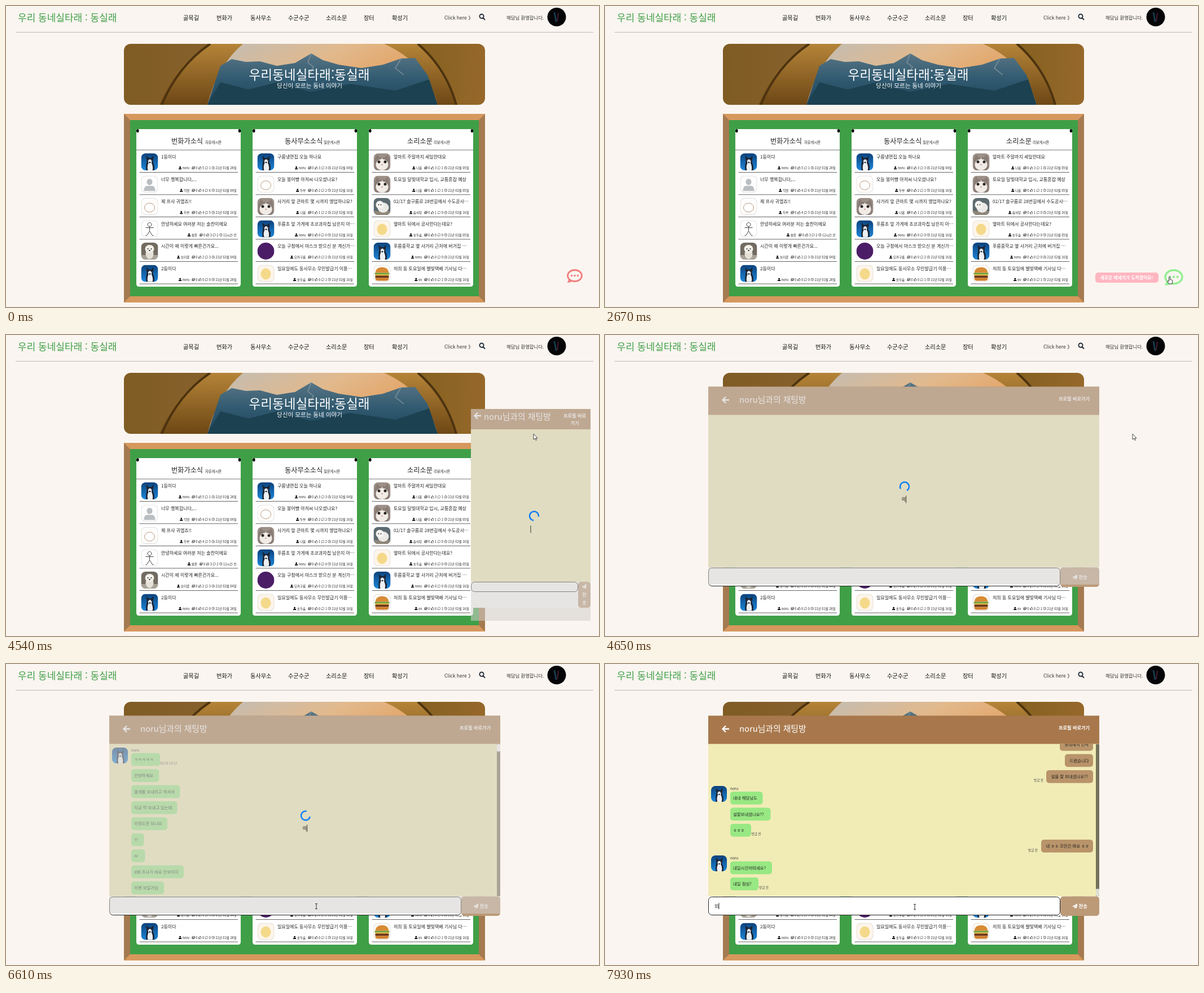
An HTML page for the animation above (8000 ms loop, 1051x533 px).

```html
<!DOCTYPE html>
<html lang="ko">
<head>
<meta charset="utf-8">
<style>
html, body { margin: 0; width: 100%; height: 100%; overflow: hidden; background: #faf5f0; }
svg { display: block; width: 1051px; height: 533px; }
text { font-family: "Noto Sans CJK KR", "Noto Sans CJK", "Noto Sans", sans-serif; white-space: pre; }
</style>
</head>
<body>
<svg id="stage" viewBox="0 0 1051 533">
<defs>
  <clipPath id="round"><rect width="30" height="30" rx="8"/></clipPath>
  <clipPath id="bannerClip"><rect x="209" y="67" width="640" height="108" rx="12"/></clipPath>
  <clipPath id="logClip"><rect x="183" y="141.5" width="693" height="270"/></clipPath>
  <linearGradient id="sky" x2="1" y2=".5"><stop stop-color="#bfbdb8"/><stop offset=".5" stop-color="#e2b98c"/><stop offset="1" stop-color="#e39a55"/></linearGradient>
  <linearGradient id="hills" x2="0" y2="1"><stop stop-color="#587585"/><stop offset=".5" stop-color="#315a70"/><stop offset="1" stop-color="#1d4459"/></linearGradient>
  <linearGradient id="wall"><stop stop-color="#7f5c24"/><stop offset=".2" stop-color="#86602a"/><stop offset=".8" stop-color="#83601f"/><stop offset="1" stop-color="#96682a"/></linearGradient>
  <linearGradient id="arch" x2="0" y2="1"><stop stop-color="#b58438"/><stop offset="1" stop-color="#6d4715"/></linearGradient>
  <linearGradient id="blue" x2="0" y2="1"><stop stop-color="#0b427c"/><stop offset="1" stop-color="#1c86da"/></linearGradient>
  <linearGradient id="listHead" x2="0" y2="1"><stop stop-color="#a97c57"/><stop offset="1" stop-color="#bd9674"/></linearGradient>

  <symbol id="user" viewBox="0 0 10 10"><circle cx="5" cy="2.8" r="2.6"/><path d="M0 10Q0 5.8 3 5.8H7Q10 5.8 10 10Z"/></symbol>
  <symbol id="images" viewBox="0 0 10 10"><path d="M2.5 1H9.5V7H2.5ZM.6 3V9H8M3 6L5 4L6 5L7.5 3L9 6" fill="none" stroke="#222" stroke-width="1.2"/></symbol>
  <symbol id="thumb" viewBox="0 0 10 10"><path d="M.6 4.5H2.6V9.4H.6ZM2.6 5L5 2.5V.7H6.3V4H9.4L8.3 9.3H4L2.6 8.5" fill="none" stroke="#222" stroke-width="1.1"/></symbol>
  <symbol id="comment" viewBox="0 0 10 10"><path d="M1.7 8L.6 9.5L3.5 8.5C7 9.3 9.4 7 9.4 4.8C9.4-.3.6-.3.6 4.8Q.6 6.7 1.7 8Z" fill="none" stroke="#222" stroke-width="1.1"/></symbol>
  <symbol id="clock" viewBox="0 0 10 10"><path d="M5 .6A4.4 4.4 0 1 1 4.99.6M5 2.5V5.3L7 6.4" fill="none" stroke="#222" stroke-width="1.2"/></symbol>
  <symbol id="plane" viewBox="0 0 10 10"><path d="M10 0L8.3 9L5.4 7.8L4 10V7.2L8 2.5L3 6.7L0 5.6Z" fill="#fff"/></symbol>
</defs>
</svg>
<script>
const LOOP = 8000;
const svg = document.getElementById('stage');
const $ = id => document.getElementById(id);
const rect = (x, y, w, h, fill, rx = 0, more = '') =>
  `<rect x="${x}" y="${y}" width="${w}" height="${h}" rx="${rx}" fill="${fill}" ${more}/>`;
const path = (d, fill, stroke = 'none', w = 1, more = '') =>
  `<path d="${d}" fill="${fill}" stroke="${stroke}" stroke-width="${w}" ${more}/>`;
const oval = (x, y, rx, ry, fill) => `<ellipse cx="${x}" cy="${y}" rx="${rx}" ry="${ry}" fill="${fill}"/>`;
const text = (x, y, s, size, fill = '#222', weight = 400, anchor = 'start') =>
  `<text x="${x}" y="${y}" font-size="${size}" fill="${fill}" font-weight="${weight}" text-anchor="${anchor}">${s}</text>`;
const use = (id, x, y, w) => `<use href="#${id}" x="${x}" y="${y}" width="${w}" height="${w}"/>`;
const group = (id, body, more = '') => `<g id="${id}" ${more}>${body}</g>`;
const em = s => [...s].reduce((n, c) => n + (c > '\u3130' ? .92 : c === ' ' ? .224 : '.!'.includes(c) ? .28 : .555), 0);

// Avatars, each in a 30 by 30 box
const avatars = {
  husky: rect(0, 0, 30, 30, 'url(#blue)') + path('M9 30Q8 20 10 15L9 4L13 8H18L22 4L21 16Q25 22 23 30Z', '#1b2433') +
    path('M12 12Q15.5 9 19 12L18.500 17Q22 24 20 30H12Q10 23 13 17Z', '#edf0f3') + oval(15.500, 16, 1.500, 1.200, '#16202c') +
    oval(13, 12, .8, .8, '#224') + oval(18, 12, .8, .8, '#224'),
  anon: rect(0, 0, 30, 30, '#fdfdfd') + oval(15, 11, 5, 5.5, '#b9bec2') + path('M5 27Q5 18 11 18H19Q25 18 25 27Z', '#b9bec2'),
  pale: rect(0, 0, 30, 30, '#fffdfb') + '<ellipse cx="15" cy="17" rx="9" ry="8" fill="#fff" stroke="#b99a80"/>',
  stick: rect(0, 0, 30, 30, '#fff') + path('M15 4A3.500 3.500 0 1 1 14.990 4M15 11V19L10 27H8M15 19L20 27H22M8 13H22', 'none', '#444'),
  dog: rect(0, 0, 30, 30, '#716b61') + rect(0, 22, 30, 8, '#a9a398') + oval(15, 20, 7, 9, '#e6e1d8') + oval(15, 11, 8, 7, '#f4f1eb') +
    oval(12, 11, 1, 1, '#222') + oval(18, 11, 1, 1, '#222') + oval(15, 14, 1.500, 1, '#222'),
  cat: rect(0, 0, 30, 30, '#9d9088') + path('M2 30V10L6 2L11 7H20L25 2L28 11V30Z', '#8a7d76') + oval(15, 20, 11, 10, '#f1ebe6') +
    path('M15 7L19 20H11Z', '#f1ebe6') + oval(9.500, 15, 2.500, 2.500, '#2c2725') + oval(20.500, 15, 2.500, 2.500, '#2c2725') + oval(15, 20, 1.500, 1, '#c98f88'),
  puff: rect(0, 0, 30, 30, '#5d6b70') + rect(0, 23, 30, 7, '#8e8779') + oval(17, 17, 10, 9, '#ebe9e5') + oval(11, 12, 7, 7, '#f5f3f0') +
    oval(9, 12, .9, .9, '#222') + oval(13, 12, .9, .9, '#222'),
  chick: rect(0, 0, 30, 30, '#fdf5ea') + oval(15, 16, 9, 10, '#f5d98a'),
  burger: rect(0, 0, 30, 30, '#fdfaf5') + path('M3 14Q4 4 15 4T27 14Z', '#d88b35') + rect(2, 14, 26, 3, '#6da23a', 1) +
    rect(3, 17, 24, 3, '#e4b43c') + rect(3, 19, 24, 4, '#6b3519', 1) + path('M3 23H27Q27 28 22 28H8Q3 28 3 23Z', '#d0812f'),
  night: rect(0, 0, 30, 30, '#050507') + path('M12 8L14 22', 'none', '#185064', 2.500) + path('M18 8L16 21', 'none', '#4a2034', 2)
};
const light = ['anon', 'pale', 'stick', 'chick', 'burger'];
const symbols = Object.entries(avatars).map(([id, art]) => `<symbol id="${id}" viewBox="0 0 30 30"><g clip-path="url(#round)">${art}</g>` +
  (light.includes(id) ? rect(.4, .4, 29.2, 29.2, 'none', 7.6, 'stroke="#ccc" stroke-width=".7"') : '') + '</symbol>').join('') +
  '<symbol id="plum" viewBox="0 0 30 30"><circle cx="15" cy="15" r="15" fill="#4b1d66"/></symbol>';

// Page
const feb = d => `21년 02월 ${d}일`, jan = '21년 01월 28일';
const boards = [
  [231, '번화가소식', 293, '자유게시판', 353, [
    ['husky', '1등이다', 'noru', 5, 1, jan],
    ['anon', '너무 행복합니다,...', '익명', 4, 6, feb('04')],
    ['pale', '제 프사 귀엽죠!!', '두부', 4, 5, feb(16)],
    ['stick', '안녕하세요 여러분 저는 솔찬이에요', '솔찬', 3, 2, '12시간 전'],
    ['dog', '시간이 왜 이렇게 빠른건가요...', '보리콩', 2, 3, feb('04')],
    ['husky', '2등이다', 'noru', 0, 0, jan]]],
  [437, '동사무소소식', 494, '질문게시판', 563, [
    ['husky', '구름냉면집 오늘 하나요', 'noru', 3, 3, feb('04')],
    ['pale', '오늘 붕어빵 아저씨 나오셨나요?', '두부', 2, 2, feb(16)],
    ['cat', '사거리 앞 큰마트 몇 시까지 영업하나요?', '나봄', 1, 2, feb(16)],
    ['husky', '푸름초 앞 가게에 초코과자칩 남은지 아…', 'noru', 0, 0, feb(16)],
    ['plum', '오늘 구청에서 마스크 받으신 분 계신가…', '모카구름', 0, 2, feb(16)],
    ['chick', '일요일에도 동사무소 무인발급기 이용…', '호두숲', 0, 1, feb(16)]]],
  [643, '소리소문', 711, '리뷰게시판', 758, [
    ['cat', '앞마트 주말까지 세일한대요', '나봄', 3, 1, feb('05')],
    ['cat', '토요일 달빛대학교 입시, 교통혼잡 예상', '나봄', 1, 1, feb('05')],
    ['puff', '02/17 솔구름로 28번길에서 수도공사…', '솜사탕', 1, 0, feb(16)],
    ['chick', '옆마트 뒤에서 공사한다는데요?', '호두숲', 0, 0, feb('05')],
    ['husky', '푸름중학교 옆 사거리 근처에 버거집 …', 'noru', 0, 0, feb(16)],
    ['burger', '저희 동 토요일에 별빛택배 기사님 다…', 'ov', 0, 1, feb(16)]]]
];

function meta(right, y, name, likes, replies, date) {
  const size = 5.6;
  let x = right, out = '';
  for (const [icon, label, gap] of [['clock', date, 1.6], ['comment', replies, 1.6], ['thumb', likes, 1.6], ['images', 0, 4], ['user', name, 0]]) {
    x -= em(String(label)) * size;
    out += text(x, y, label, size);
    x -= 7;
    out += use(icon, x, y - 5, 5.6);
    x -= gap;
  }
  return out;
}

function board([x, title, tx, sub, sx, posts]) {
  const rows = posts.map(([face, line, ...info], i) => {
    const y = 261 + i * 39.5;
    return use(face, x + 8.5, y, 30) + text(x + 44, y + 9, line, 8) + meta(x + 177, y + 28, ...info) + rect(x + 5.5, y + 33, 174.5, 1, '#666');
  }).join('');
  return path(`M${x} 218h185v274q0 5 -5 5h-175q-5 0 -5-5z`, '#fff') +
    oval(x + 2.3, 221, 2.3, 3, '#000') + oval(x + 183, 221, 2.3, 3, '#000') +
    text(tx, 244, title, 12.2, '#222', 500) + text(sx, 243.5, sub, 6.3) + rect(x, 254.5, 185, 1, '#777') + rows;
}

const nav = [['골목길', 314], ['번화가', 373], ['동사무소', 433], ['수군수군', 500], ['소리소문', 567], ['장터', 634], ['확성기', 684]];
const header = text(21, 27, '우리 동네실타래 : 동실래', 17, '#3f9f47', 500) +
  nav.map(([s, x]) => text(x, 24.5, s, 10.2, '#111', 500)).join('') +
  text(777, 24, 'Click here 》', 8.6, '#333') +
  path('M843 14.500A3.700 3.700 0 1 1 842.990 14.500M845.500 21L849 24.500', 'none', '#222c3a', 1.9) +
  text(887, 23.5, '해담님 환영합니다.', 8.4, '#333') +
  '<circle cx="976" cy="19.500" r="16.500" fill="#050507"/>' +
  path('M972 11L975 28', 'none', '#164458', 2.4) + path('M979 12L977 27', 'none', '#4a2034', 1.8) +
  rect(17, 46, 1024, 1, '#bbb7b3');

const banner = `<g clip-path="url(#bannerClip)">` + rect(209, 67, 640, 108, 'url(#wall)') +
  path('M360 67Q300 105 272 175H765Q800 175 800 175Q775 100 728 67Z', 'url(#arch)') +
  path('M362 67Q305 105 276 175M730 67Q780 110 798 175', 'none', '#4d330f', 4) +
  path('M420 67Q375 105 357 175H765Q745 100 670 67Z', 'url(#sky)') +
  path('M380 106L400 94L425 99L450 98L480 106L512 101L541 84L562 96L590 104L630 110L668 104L700 93L725 92L747 122L765 175H357Z', 'url(#hills)') +
  path('M357 175L380 135L430 148L480 135L540 152L610 138L690 150L750 130L765 175Z', '#1c4150') +
  path('M541 84L535 100L545 108L538 120M700 93L690 110L705 122', 'none', '#7b909a', 1.5) + '</g>' +
  text(537.5, 130, '우리동네실타래:동실래', 22.6, '#fff', 500, 'middle') +
  text(538, 144.5, '당신이 모르는 동네 이야기', 10.6, '#fff', 400, 'middle');

const frame = rect(209, 191, 640, 334, '#a57a50') + path('M209 191H849L838 202H220ZM209 525H849L838 514H220Z', '#d6985d') +
  rect(220, 202, 618, 312, '#3f9f47');

const chatButton = group('chatButton', '<ellipse cy="11.500" rx="12.500" ry="10" fill="none" stroke="currentColor" stroke-width="2.800"/>' +
  path('M-11 16Q-10.500 20-13.500 23.500Q-8 24.500-4 21', 'currentColor') + [-5.5, 0, 5.5].map(x => oval(x, 11.5, 1.8, 1.8, 'currentColor')).join(''));
const notice = group('notice', rect(869, 472, 112, 18, '#ffb6c1', 5) + text(924.5, 484, '새로운 메세지가 도착했어요!', 7.8, '#fff', 700, 'middle'));

// Chat list
const opened = name => name + '님과의 채팅방이 개설되었습니다!';
const chats = [
  ['husky', 'noru', '내일 점심?', '방금 전'],
  ['stick', '솔찬', '먼소리야그게 ' + 'ㅋ'.repeat(15) + '…', '12시간 전'],
  ['plum', '모카구름', opened('모카구름'), ''],
  ['anon', '폴짝폴짝', opened('폴짝폴짝'), ''],
  ['burger', 'ov', 'ov', '16시간 전'],
  ['cat', '나봄', 'ㅇㅎㄴㄹㅇ', '21시간 전'],
  ['night', '해담', 'ㅋㅌㅊㅋㅌㅊ', '02/17 17:18'],
  ['anon', '한별찬', '재시도해보겟습니다 ㅋㅋ', '02/17 17:18']
];
const list = group('list', rect(860.5, 132.5, 186, 376, '#e2d3c4', 4, 'stroke="#6aa56a"') + rect(861, 133, 185, 20, 'url(#listHead)', 3) +
  text(866, 145, '채팅목록', 12.2, '#fff', 700) + '<circle cx="1034.500" cy="142" r="5.500" fill="#fff"/>' +
  path('M1032.500 140L1036.500 144M1036.500 140L1032.500 144', 'none', '#8d6647', 1.5) +
  chats.map(([face, name, line, when], i) => {
    const y = 154 + i * 44.1;
    return use(face, 864.5, y + 4, 36) + text(904, y + 12.5, name, 8.2, '#111') + text(904, y + 23, line, 6.3, '#111') +
      text(904, y + 33, when, 6.3, '#111') + rect(861, y - 1, 185, 1, '#f6efe8');
  }).join('') + rect(1046, 132, 5, 377, '#d0ccc8') + rect(1046, 411, 5, 97, '#7c7c7c'));

// Chat room
const BROWN = '#a8784c', SAND = '#f1ecb6', VEIL = '#d3cfcd';
const back = (x, y) => path(`M${x + 12} ${y}H${x + 1}M${x + 6} ${y - 5.5}L${x + .5} ${y}L${x + 6} ${y + 5.5}`, 'none', '#fff', 2.3);
const roomTitle = 'noru님과의 채팅방';
const narrowRoom = group('narrowRoom', rect(824, 131, 212, 36, BROWN) + rect(824, 167, 212, 270, SAND) + rect(824, 437, 212, 46, '#fff') +
  back(830, 143) + text(847, 150, roomTitle, 14.8, '#fff', 500) +
  text(1008, 146, '프로필 바로', 8.2, '#fff', 700, 'middle') + text(1008, 159, '가기', 8.2, '#fff', 700, 'middle') +
  rect(824.5, 437.5, 189, 17, '#fff', 6, 'stroke="#222"') + rect(1014, 437, 22, 46, '#bc9a78', 5) + use('plane', 1020, 441, 9) +
  text(1025, 463, '전', 8, '#fff', 700, 'middle') + text(1025, 477, '송', 8, '#fff', 700, 'middle') +
  rect(824, 131, 212, 375, VEIL, 0, 'opacity=".55"'));

const bubble = (x, y, w, s, fill, pad = 5) => rect(x, y, w, 22.8, fill, 5) + text(x + pad, y + 14, s, 7.4, '#222');
const theirs = (y, w, s) => bubble(222, y, w, s, '#98e883');
const mine = (y, w, s) => bubble(865 - w, y, w, s, '#b9946a', 8.5);
const sender = y => use('husky', 188, y, 28) + text(222, y + 7, 'noru', 6.4, '#333');
const stamp = (x, y, s) => text(x, y, s, 5.6, '#444');

const oldLines = [['ㅋㅋㅋㅋㅋ', 51], ['안녕하세요', 49.5], ['열개를 보내라고 하셔서', 86.5], ['지금 막 보내고 있는데', 81.5], ['이정도만 되나요', 64],
  ['!!!', 22.5], ['zz', 24.5], ['d왜 프사가 바로 안보이지', 93], ['이젠 보일거임', 58]];
const oldLog = group('oldLog', sender(148) + oldLines.map(([s, w], i) => theirs(157.8 + i * 28.4, w, s)).join('') + stamp(273, 178, '02/13 13:12') +
  rect(870, 141.5, 6, 270, '#73725a', 2) + rect(870, 142, 6, 13, '#fff', 2));
const newLog = group('newLog', mine(131, 59, '동네에서 연락') + mine(159.5, 50, '드렸습니다') + mine(188, 83, '설을 잘 보내셨나요??') + stamp(760, 208, '방금 전') +
  sender(216) + theirs(226, 57.5, '네네 해담님도') + theirs(254.5, 71.5, '설잘보내셨나요??') + theirs(283, 37, 'ㅎㅎㅎ') + stamp(259.5, 303, '방금 전') +
  mine(311, 92, '네 ㅎㅎ 조만간 봐요 ㅎㅎ') + stamp(750, 331.5, '방금 전') +
  sender(339) + theirs(349.5, 74, '내일시간어떠세요?') + theirs(378, 50, '내일 점심?') + stamp(273, 398, '방금 전') +
  rect(870, 141.5, 6, 270, '#73725a', 2) + rect(870, 398, 6, 13, '#dfded6', 2));
const wideRoom = group('wideRoom', rect(183, 141, 693, 270.5, SAND) + `<g clip-path="url(#logClip)">${oldLog}${newLog}</g>` +
  rect(183, 91.5, 693, 50, BROWN) + back(208, 115) + text(238, 120, roomTitle, 14.8, '#fff', 500) + text(804, 116, '프로필 바로가기', 8.2, '#fff', 700) +
  rect(183, 411.5, 693, 33.5, '#fff') + rect(183.5, 412.5, 623, 32, '#fff', 6, 'stroke="#222"') + rect(807, 411.5, 69, 34.5, '#bc9a78', 5) +
  use('plane', 828, 424, 9.5) + text(839.5, 432, '전송', 8.3, '#fff', 700) +
  text(194, 432, '<tspan id="draft"></tspan>', 8.4) + rect(194, 423, .9, 11, '#222', 0, 'id="inputCaret"') +
  rect(183, 91.5, 693, 350.5, VEIL, 0, 'id="veil" opacity=".55"'));

const loader = group('loader', path('M5.660-5.660A8 8 0 1 0 5.660 5.660', 'none', '#0d7df5', 2.5, 'id="spinner"') +
  '<text id="typing" font-size="8" font-weight="500" text-anchor="middle"></text>' + rect(0, 0, .9, 13, '#222', 0, 'id="typeCaret"'));

const cursors = group('cursor',
  group('arrow', path('M0 0V10L2.300 8L4 11.500L5.500 10.800L4 7.500H7Z', '#fff', '#222', .8)) +
  group('hand', path('M-1.500 -6Q-.5 -7.500 .5 -6V-1.500L4 -.8Q5 -.3 4.700 2L4 6H-1.500L-4.500 1.500Q-4 0 -1.500 1.500Z', '#fff', '#222', .9)) +
  group('beam', path('M-2 -4.500H2M0 -4.500V4.500M-2 4.500H2', 'none', '#333', 1)));

svg.insertAdjacentHTML('beforeend', symbols + header + banner + frame + boards.map(board).join('') +
  chatButton + notice + list + narrowRoom + wideRoom + loader + cursors);

// Motion
const T = { arrive: 1300, enter: 1800, hover: 2170, open: 2780, close: 4290, room: 4390, type: 4540, widen: 4640, log: 5700, ready: 6740, focus: 7070, blink: 7600, draft: 7930 };
const route = [[1800, 1050, 470], [2400, 1001, 486], [2850, 1001, 486], [3430, 962, 216], [3650, 962, 216], [4150, 935, 175],
  [4660, 935, 175], [5180, 678, 413], [5600, 550, 429], [6800, 550, 429], [6930, 548, 430], [7070, 549, 430]];
const show = (id, on) => $(id).setAttribute('display', on ? 'inline' : 'none');
const move = (id, x, y, more = '') => $(id).setAttribute('transform', `translate(${x} ${y}) ${more}`);
const clamp = v => Math.max(0, Math.min(1, v));

function pointer(t) {
  const i = route.findIndex(p => p[0] > t);
  if (i < 1) return route[i < 0 ? route.length - 1 : 0].slice(1);
  const [a, b] = [route[i - 1], route[i]];
  const k = (t - a[0]) / (b[0] - a[0]), e = k * k * (3 - 2 * k);
  return [a[1] + (b[1] - a[1]) * e, a[2] + (b[2] - a[2]) * e];
}

const phrase = '이웃을 부르는 중...';
function typed(t) {
  const u = Math.max(0, t - T.type) % 1960;
  const n = Math.min(Math.floor(u / 105), phrase.length, Math.ceil((1950 - u) / 45));
  return phrase.slice(0, Math.max(0, n));
}

function draw(t) {
  const arrived = t >= T.arrive, wide = t >= T.widen, ready = t >= T.ready;
  show('chatButton', t < T.open);
  $('chatButton').style.color = arrived ? '#90ee90' : '#f08080';
  move('chatButton', 1008, 466, `scale(${1 + .2 * clamp((t - T.hover) / 200)})`);
  show('notice', arrived && t < T.open);
  show('list', t >= T.open && t < T.close);
  show('narrowRoom', t >= T.room && !wide);
  show('wideRoom', wide);
  show('oldLog', t >= T.log && !ready);
  show('newLog', ready);
  show('veil', !ready);

  show('loader', t >= T.room && !ready);
  const [sx, sy, tx, ty] = wide ? [531, 268.5, 529.5, 294] : [936, 320.5, 929.5, 347];
  const word = typed(t);
  move('spinner', sx, sy, `rotate(${(t - 5180) / 750 * 360})`);
  $('typing').textContent = word;
  move('typing', tx, ty);
  move('typeCaret', tx + em(word) * 4, ty - 9.5);

  const hasDraft = t >= T.draft;
  $('draft').textContent = hasDraft ? '외' : '';
  show('inputCaret', (t >= T.focus && t < T.blink) || hasDraft);
  move('inputCaret', hasDraft ? 7.5 : 0, 0);

  const [x, y] = pointer(t);
  const kind = t >= 5280 ? 'beam' : (t >= T.hover && t < T.close) || t >= 5100 ? 'hand' : 'arrow';
  show('cursor', t >= T.enter);
  move('cursor', x, y);
  for (const id of ['arrow', 'hand', 'beam']) show(id, id === kind);
}

const start = performance.now();
function tick() {
  draw((performance.now() - start) % LOOP);
  requestAnimationFrame(tick);
}
draw(0);
requestAnimationFrame(tick);
</script>
</body>
</html>
```
